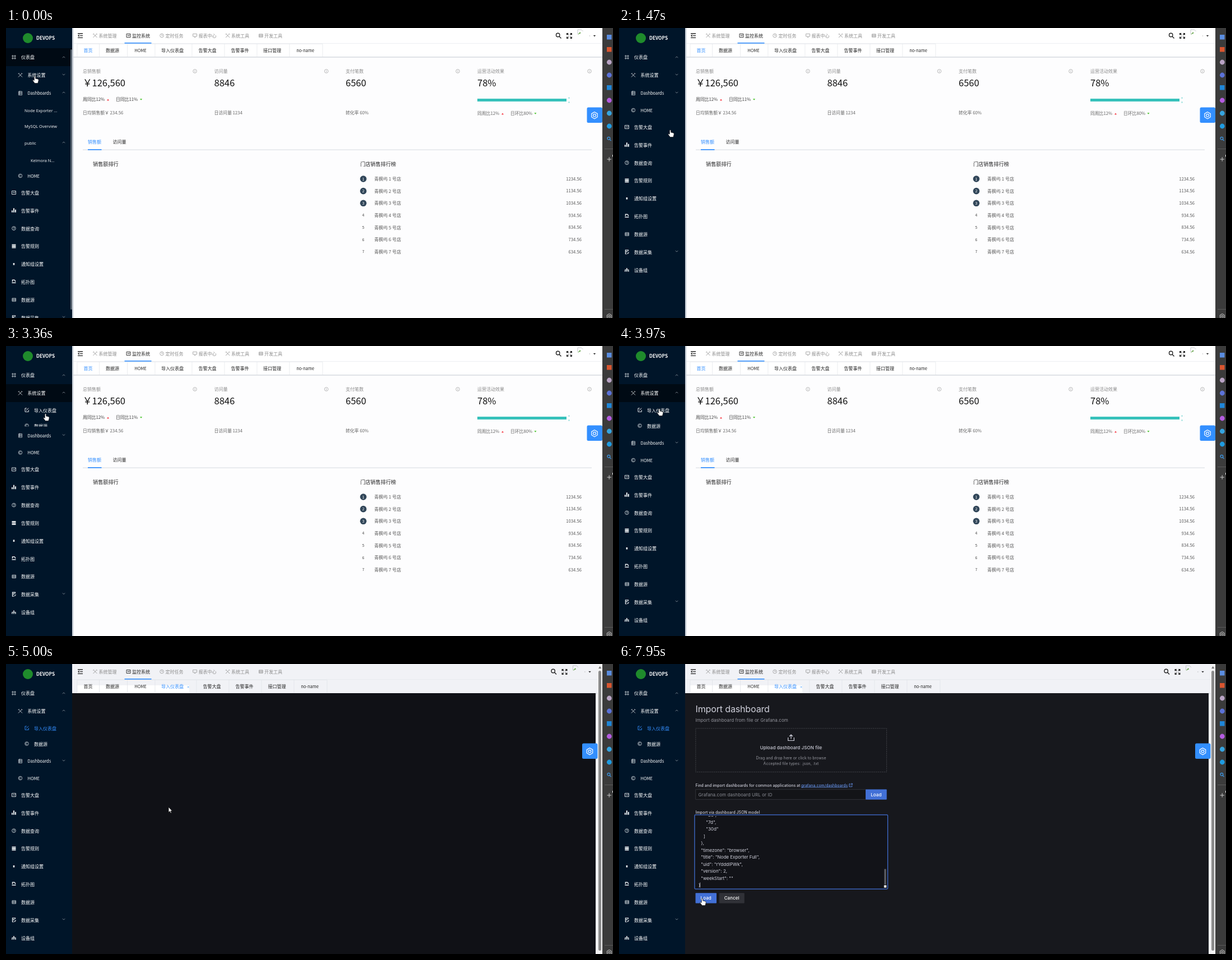
An HTML page that plays this animation: 1083 by 517 pixels, repeating every 8000 ms.

```html
<!DOCTYPE html>
<html lang="zh-CN">
<head>
<meta charset="utf-8">
<title>DEVOPS</title>
<style>
  html, body { margin: 0; width: 100%; height: 100%; overflow: hidden; background: #fff; }
  svg { display: block; }
  text { font-family: "Noto Sans CJK SC", "Noto Sans CJK JP", "Open Sans", sans-serif; }
  text.latin { font-family: "Open Sans", "Noto Sans", sans-serif; }
  .form text { font-family: Inter, Roboto, sans-serif; letter-spacing: .0107em; }
  .form text.code { letter-spacing: 0; }
</style>
</head>
<body>
<svg id="stage" width="1083" height="517" viewBox="0 0 1083 517"></svg>
<script>
const BLUE = '#338fff', NAVY = '#001529', INK = '#262626', GREY = '#666', PALE = '#8c8c8c';

const rect = (x, y, w, h, fill, more = '') =>
  `<rect x="${x}" y="${y}" width="${w}" height="${h}" fill="${fill}" ${more}/>`;
const circle = (x, y, r, fill, more = '') =>
  `<circle cx="${x}" cy="${y}" r="${r}" fill="${fill}" ${more}/>`;
const path = (d, stroke, width = .8, fill = 'none') =>
  `<path d="${d}" stroke="${stroke}" stroke-width="${width}" fill="${fill}"/>`;
// y is the middle of the line
const text = (s, x, y, fill, size = 8, more = '') =>
  `<text x="${x}" y="${y + size * .37}" fill="${fill}" font-size="${size}" ${more}>${s}</text>`;
const group = (id, body, more = '') => `<g id="${id}" ${more}>${body}</g>`;
const at = (x, y, body) => `<g transform="translate(${x} ${y})">${body}</g>`;
const MID = 'text-anchor="middle"', END = 'text-anchor="end"', MEDIUM = 'font-weight="500"';

const RING = 'M-3.3 0a3.3 3.3 0 1 0 6.6 0a3.3 3.3 0 1 0-6.6 0';
const ICONS = {
  grid: ['M-3-3h2v2h-2zM1-3h2v2h-2zM-3 1h2v2h-2zM1 1h2v2h-2z', .7],
  tools: ['M-3.5 3.5L3-3M-3-3L3.5 3.5M-3.8-2L-2-3.8M2-3.8L3.8-2', .8],
  list: ['M-3-3h6v6.5h-6zM-3-1h6M-3 1h6M-1-4v7', .7],
  copy: [RING + 'M1.3-1.2a1.8 1.8 0 1 0 0 2.4', .7],
  chart: ['M-3.5-3h7v6h-7zM-2 .5L-.5-1 .7 .8 2.5-1.5', .9],
  bars: ['M-3 3.5V0M0 3.5V-4M3 3.5V-1.5', 2],
  help: [RING + 'M-1-1a1.1 1 0 1 1 1 1.4V1M0 1.6v.7', .8],
  table: ['M-3.5-2.5h7M-3.5 0h7M-3.5 2.6h7', 2],
  dot: ['M-1.3 0h2.6', 3.6],
  topo: ['M-2.5 0v-3.3h3.5l1.5 1.5V0M-3.5 1.7h7', 1.4],
  stack: ['M-3-2.6h6.5v5.4h-6.5zM-3-.8h6.5M-3 1h6.5', .8],
  doc: ['M2.5-1.5V-3.5h-5v7h2.5M-1.5-1.5h3M-1.5 .2h2M1 3.5l2.6-3', 1.2],
  tree: ['M0-3v3M-3 2.5V0h6v2.5M-1-2.5h2M-4 2.5h2M-1 2.5h2M2 2.5h2M0 0v2', 1.2],
  edit: ['M0-3h-3v6.3h6.3V0M-1 1L3.3-3.3', .9],
  info: [RING + 'M0-.5v2.3M0-1.9v.8', .6],
  clock: [RING + 'M0-2v2h1.6', .7],
  screen: ['M-3.5-3h7v4.4h-7zM-1.5 3h3', .7],
  gear: ['M0-6L5.2-3V3L0 6-5.2 3V-3ZM-2.3 0a2.3 2.3 0 1 0 4.6 0a2.3 2.3 0 1 0-4.6 0', 1.2],
  search: ['M-4-1a3.2 3.2 0 1 0 6.4 0a3.2 3.2 0 1 0-6.4 0M1.6 1.4L5 5', 1.4],
  expand: ['M-1.3-1.3L-4-4M1.3-1.3L4-4M-1.3 1.3L-4 4M1.3 1.3L4 4M-4.4-1.5v-2.9h2.9M4.4-1.5v-2.9H1.5M-4.4 1.5v2.9h2.9M4.4 1.5v2.9H1.5', 1.2],
};
const icon = (name, x, y, color) => at(x, y, path(ICONS[name][0], color, ICONS[name][1]));
const chevron = (up, y, id = '') =>
  `<g id="${id}">${at(103, y, path(up ? 'M-2.3 1L0-1 2.3 1' : 'M-2.3-1L0 1 2.3-1', '#8a949e', .8))}</g>`;
const row = (name, label, x, y) => icon(name, x, y - .5, '#e8ebee') +
  text(label, x + 13, y, '#fff', /^\w+$/.test(label) ? 7.5 : 8, MEDIUM);

function sidebar() {
  const rest = [['chart', '告警大盘'], ['bars', '告警事件'], ['help', '数据查询'], ['table', '告警规则'],
    ['dot', '通知组设置'], ['topo', '拓扑图'], ['stack', '数据源'], ['doc', '数据采集'], ['tree', '设备组']];
  const rows = rest.map(([name, label], i) => row(name, label, 14, 177 + i * 31.82)).join('');
  const leaf = (s, x, y) => text(s, x, y, '#fff', 7.4, 'class="latin"');
  return rect(0, 0, 118, 517, NAVY) +
    group('hoverTop', rect(0, 36, 118, 32, '#000a14')) +
    group('hoverSys', rect(0, 68, 118, 32, '#000a14')) +
    circle(39, 18, 9, '#1f8b2c') + text('DEVOPS', 54, 18, '#fff', 8.3, 'font-weight="700"') +
    row('grid', '仪表盘', 14, 52.5) + chevron(true, 52) +
    row('tools', '系统设置', 25.5, 84.5) + chevron(false, 83, 'sysDown') + chevron(true, 83, 'sysUp') +
    `<svg id="sysBox" y="100" width="118" height="0">` +
      group('import', icon('edit', 37, 14, 'currentColor') + text('导入仪表盘', 50, 15, 'currentColor', 8, MEDIUM)) +
      icon('copy', 37, 42, '#e8ebee') + text('数据源', 50, 43, '#fff', 8, MEDIUM) + `</svg>` +
    group('dash', row('list', 'Dashboards', 25.5, 116.5) + chevron(false, 115, 'dashDown') + chevron(true, 115, 'dashUp') +
      `<svg id="dashBox" y="132" width="118" height="117">` +
        leaf('Node Exporter ...', 33, 15) + leaf('MySQL Overview', 33, 43) + leaf('public', 33, 73) +
        at(0, -132, chevron(true, 204)) + leaf('Kelmora N...', 44, 104) + `</svg>`) +
    group('rest', row('copy', 'HOME', 25.5, 147) + rows + chevron(false, 398)) +
    group('sideBar', rect(115, 38, 3, 464, '#56616d', 'rx="1.5"'));
}

function header() {
  const menu = [['tools', '系统管理', 159], ['chart', '监控系统', 218.5], ['clock', '定时任务', 278],
    ['screen', '报表中心', 337], ['tools', '系统工具', 395.5], ['stack', '开发工具', 454.5]];
  const items = menu.map(([name, label, x], i) => {
    const color = i == 1 ? INK : PALE;
    return icon(name, x, 13.5, color) + text(label, x + 6.5, 14, color);
  }).join('');
  const names = ['首页', '数据源', 'HOME', '导入仪表盘', '告警大盘', '告警事件', '接口管理', 'no-name'];
  const tabs = (centers, edges, active, line) =>
    edges.map(x => rect(x, 28, .8, 23, line)).join('') + rect(127, 28, edges.at(-1) - 127, .7, line) +
    names.map((s, i) => text(s, centers[i], 40, i == active ? BLUE : INK, /\w/.test(s) ? 7.5 : 8, MID)).join('');
  return rect(118, 0, 946, 52, '#fff') +
    group('greyHead', rect(118, 0, 946, 52, '#f1f2f6') + rect(127, 38, 200, 14, '#fff')) +
    rect(118, 27.2, 946, .7, '#e6e8ec') +
    path('M128 10h9M132 13.7h5M128 17.4h9', INK, 1.3) + path('M130.6 11.7v4l-2.6-2z', INK, .2, INK) +
    items + rect(211.5, 26, 48, 1.6, BLUE) +
    group('homeTabs', tabs([146.5, 190, 240, 297, 359.5, 417.5, 475, 534],
      [126.5, 166, 216, 265.5, 331.5, 389.5, 447.5, 505.5, 564.5], 0, '#e6e8ec')) +
    group('importTabs', tabs([146.5, 190, 240, 297, 367.5, 425.5, 483.5, 542],
      [126.5, 166, 216, 265.5, 339.5, 397.5, 455.5, 513.5, 572.5], 3, '#e2e4e9') +
      path('M323.7 39.5l3 3m0-3l-3 3', BLUE, .6)) +
    group('tools', icon('search', 985.5, 13.5, INK) + icon('expand', 1005, 14, INK) +
      path('M1020 11V3h6.5l3 3', '#b9bcc2', .8) + path('M1020.5 11.5l3.5-4 1.5 1.5z', '#5fa043', .3, '#5fa043') +
      rect(1041, 13, .8, 2, '#bbb') + path('M1048 13h4l-2 2.2z', INK, .2, INK));
}

function home() {
  const up = (x, y) => path(`M${x - 2} ${y + 1.2}h4l-2-2.4z`, 'none', 0, '#f5222d');
  const down = (x, y) => path(`M${x - 2} ${y - 1.2}h4l-2 2.4z`, 'none', 0, '#3cbf1c');
  const stats = [[137, '总销售额', '￥126,560', '日均销售额￥ 234.56'], [371.5, '访问量', '8846', '日访问量 1234'],
    [606, '支付笔数', '6560', '转化率 60%'], [841, '运营活动效果', '78%', '']];
  const cards = stats.map(([x, title, value, foot]) => text(title, x, 77, PALE) +
    icon('info', x + 200, 77, PALE) + text(value, x, 98, '#111', 16.5) + text(foot, x, 151, GREY, 7.8)).join('');
  let shops = '';
  for (let i = 0; i < 7; i++) {
    const y = 269 + i * 21.65, top = i < 3;
    shops += (top ? circle(637.5, y, 5.8, '#314659') : '') +
      text(i + 1, 637.5, y, top ? '#fff' : '#444', 6.8, MID) +
      text(`青枫屿 ${i + 1} 号店`, 657, y, '#595959') +
      text((1234.56 - i * 100).toFixed(2), 1027, y, '#595959', 7.7, END);
  }
  return rect(118, 52, 946, 465, '#fdfdfe') + cards +
    text('周同比12%', 137, 127.5, '#444', 7.8) + up(182, 128) + text('日同比11%', 196, 127.5, '#444', 7.8) + down(241, 127.5) +
    rect(841, 126, 159, 5, '#36c1bb') + rect(1004, 123.5, 1, 2.3, '#36c1bb') + rect(1004, 131.3, 1, 2.3, '#36c1bb') +
    text('同周比12%', 841, 152.5, GREY, 7.8) + up(886, 153) + text('日环比80%', 900, 152.5, GREY, 7.8) + down(944.5, 152.5) +
    rect(137, 216.6, 908, 1, '#d5d9e0') + rect(146, 216, 24.5, 1.7, BLUE) +
    text('销售额', 146, 203.5, BLUE) + text('访问量', 190.5, 203.5, INK) +
    text('销售额排行', 155, 243, INK, 9.15, MEDIUM) + text('门店销售排行榜', 632, 243, INK, 9.15, MEDIUM) + shops;
}

function form() {
  const lines = (list, y, color) => list.map((s, i) =>
    text(s.trim(), 141.7 + s.search(/\S/) * 2.25, y + i * 12.5, color, 8, 'class="code"')).join('');
  const hint = ['{', '    "title": "Example - Repeating Dictionary variables",', '    "uid": "_0HnEoN4z",',
    '    "panels": [...]', '    ...', '}'];
  const json = ['      "2d",', '      "7d",', '      "30d"', '    ]', '  },', '  "timezone": "browser",',
    '  "title": "Node Exporter Full",', '  "uid": "rYdddlPWk",', '  "version": 2,', '  "weekStart": ""', '}'];
  const LIGHT = '#d0d1dc', DIM = '#8a8c94', BUTTON = '#4270d6';
  const button = (s, x, y, w, fill) => rect(x, y, w, 18.3, fill, 'rx="1"') +
    text(s, x + w / 2, y + 9.2, '#fff', 8, MID + ' ' + MEDIUM);
  return rect(118, 52, 934, 465, '#17181d') +
    text('Import dashboard', 136.5, 80, LIGHT, 16, 'style="letter-spacing:-.14px"') +
    text('Import dashboard from file or Grafana.com', 136.5, 100, '#96979f') +
    rect(136.8, 114.8, 340.7, 77.7, 'none', 'stroke="#55575e" stroke-width=".7" stroke-dasharray="2 1.4"') +
    path('M301.7 131v5.5h10.6V131M307 133.5v-7M304 129l3-3 3 3', LIGHT, 1.2) +
    text('Upload dashboard JSON file', 307, 149, LIGHT, 8, MID + ' ' + MEDIUM) +
    text('Drag and drop here or click to browse', 307, 167, '#96979f', 6.86, MID) +
    text('Accepted file types: .json, .txt', 307, 177.5, '#96979f', 6.86, MID) +
    text('Find and import dashboards for common applications at', 136.5, 216, LIGHT, 6.86, MEDIUM) +
    text('grafana.com/dashboards', 325, 216, '#6e9fff', 6.86, 'text-decoration="underline"') +
    path('M413 213.8h-2.2v5h5v-2.3M413 216.5l3.2-3.2M414 213.2h2.3v2.3', '#6e9fff', .8) +
    rect(136.8, 223.8, 303.5, 17.5, '#131418', 'stroke="#3c3e45" stroke-width=".7"') +
    text('Grafana.com dashboard URL or ID', 141.5, 233, DIM) + button('Load', 440, 223.4, 37.7, BUTTON) +
    text('Import via dashboard JSON model', 136.5, 264.5, LIGHT, 6.86, MEDIUM) +
    rect(136.8, 271, 340.7, 128, '#15161a', 'stroke="#55575e" stroke-width=".7"') +
    path('M473 398l4-4M475 398l2-2', '#777', .6) +
    group('ring', rect(134.9, 268.9, 344.6, 132.2, '#121318', `stroke="${BUTTON}" stroke-width="1.25" rx="1.5"`)) +
    group('hint', lines(hint, 279, '#82848c')) +
    group('hintCaret', rect(141.6, 274, .8, 9.5, LIGHT)) +
    group('json', `<svg x="137" y="271" width="341" height="129">` +
      at(-137, -271, lines(json, 269.2, LIGHT)) + `</svg>` + rect(144.3, 389.5, .8, 9, LIGHT) +
      rect(473.3, 365.5, 3.2, 27.5, '#5d5e63') + rect(472.8, 394.3, 4.4, 4.4, '#e8e8e8')) +
    button('Load', 136.5, 408.3, 37.5, BUTTON) + button('Cancel', 178.7, 408.3, 45, '#303137');
}

function browserEdge() {
  const marks = [[16, '#5a8de0', 1], [38, '#d9552f', 1], [61, '#b9a3c4', 0], [84, '#5b72d8', 0], [106, '#1f86d8', 1],
    [129, '#b45be0', 0], [152, '#35a4e0', 0], [175, '#1f9be0', 0]];
  return rect(1064, 0, 19, 517, '#3b3b3b') +
    marks.map(([y, color, square]) => square ? rect(1072, y - 4, 8.5, 8.5, color) : circle(1076.3, y, 4.4, color)).join('') +
    at(1076, 197.5, path('M-3-.8a2.4 2.4 0 1 0 4.8 0a2.4 2.4 0 1 0-4.8 0M1.2 1.2L3.6 3.6', '#3b9cf0', 1.2)) +
    rect(1068, 215, 15, .8, '#626262') + path('M1072.5 234h7.5M1076.2 230.2v7.5', '#ddd', .9) +
    rect(1082, 226, 1, 3.5, '#eee') + rect(1068, 501, 15, .8, '#626262') +
    at(1076.3, 514, `<g transform="scale(.75)">${path(ICONS.gear[0], '#ddd', 1.2)}</g>`);
}

const cursors =
  group('hand', path('M-1.2 1q0-1.2 1.2-1.2t1.2 1.2v3l4.2 1q1.6.5 1.3 2.2l-.8 3.3-.7 2h-5.4L-3.6 8q-.6-1.4.8-1.6l1.6 1z', '#111', .7, '#fff')) +
  group('arrow', path('M0 0V9.5L2.2 7.5 3.8 11 5.3 10.3 3.8 7H6.6z', '#111', .8, '#fff')) +
  group('beam', path('M-2-4.5q2 0 2 1 0-1 2-1M0-3.5v7M-2 4.5q2 0 2-1 0 1 2 1', '#eee', .9));

document.getElementById('stage').innerHTML =
  group('home', home()) +
  group('blank', rect(118, 52, 946, 465, '#f0f2f5') + rect(118, 51.5, 937, 2, '#d9dce2') + rect(118, 52, 2, 465, '#dfe2e8')) +
  group('dark', rect(118, 52, 934, 465, '#101116')) +
  group('form', form(), 'class="form"') +
  header() + group('homeEdge', rect(118, 0, 2.5, 517, '#cdd3db') + rect(118, 51.3, 946, 1.2, '#ccd0d7')) +
  group('pageBar', rect(1055, 0, 9, 517, '#f3f3f4') + rect(1057, 12, 5, 499, '#8b8b8b', 'rx="2.5"') +
    path('M1057.2 8h5l-2.5-4z', '#777', .2, '#777')) +
  group('gearBox', rect(1036.5, 141.5, 27.5, 27.5, BLUE, 'rx="2.5"') + icon('gear', 1050, 155.7, '#fff')) +
  sidebar() + browserEdge() + group('pointer', cursors);

// The screen refreshes in bursts: first time, last time, count
const steps = [0];
for (const [from, to, n] of [[150, 1040, 7], [1200, 2170, 8], [2320, 2920, 5], [3210, 4120, 7],
  [4270, 5000, 6], [5450, 5750, 3], [6040, 6740, 6], [7040, 7950, 7]])
  for (let i = 0; i < n; i++) steps.push(from + (to - from) * i / (n - 1));

// time, x, y, shape
const moves = [[0, 51.5, 86, 'hand'], [740, 75, 115, 'hand'], [1050, 75, 115, 'hand'], [1470, 91.5, 182, 'hand'],
  [1600, 91.5, 182, 'hand'], [2170, 69, 108, 'hand'], [2920, 66, 90, 'hand'], [3215, 66, 90, 'hand'],
  [3355, 70.5, 121, 'hand'], [3500, 70.5, 121, 'hand'], [3960, 72, 112, 'hand'], [4200, 75, 112, 'arrow'],
  [4720, 284, 249, 'arrow'], [4850, 286, 251, 'arrow'], [5000, 290, 255, 'arrow'], [6030, 285, 285, 'beam'],
  [6175, 280, 304, 'beam'], [6340, 280, 304, 'beam'], [6735, 205, 410, 'arrow'], [7040, 205, 410, 'arrow'],
  [7480, 165, 414, 'hand'], [7945, 148.5, 418, 'hand'], [8001, 148.5, 418, 'hand']];

const el = id => document.getElementById(id);
const show = (id, on) => el(id).style.display = on ? '' : 'none';
const shift = (id, x, y) => el(id).setAttribute('transform', `translate(${x} ${y})`);
const ease = (t, from, to) => {
  const p = Math.min(1, Math.max(0, (t - from) / (to - from)));
  return p * p * (3 - 2 * p);
};

function draw(t) {
  const opened = t > 4110, dark = t > 4990, loaded = t > 5440, pasted = t > 7030;
  const sys = 57 * ease(t, 3210, 3432), dash = 117 * (1 - ease(t, 920, 1250));
  const sysOpen = t > 3200, dashOpen = t < 920;

  show('hoverTop', t < 200);
  show('hoverSys', sysOpen && !opened);
  show('sysUp', sysOpen);
  show('sysDown', !sysOpen);
  show('dashUp', dashOpen);
  show('dashDown', !dashOpen);
  show('sideBar', t < 1000);
  el('sysBox').setAttribute('height', sys);
  el('dashBox').setAttribute('height', dash);
  shift('dash', 0, sys);
  shift('rest', 0, sys + dash);
  el('import').style.color = opened ? BLUE : '#fff';

  for (const id of ['home', 'homeTabs', 'homeEdge']) show(id, !opened);
  for (const id of ['greyHead', 'importTabs', 'pageBar', 'blank']) show(id, opened);
  shift('tools', opened ? -8.5 : 0, 0);
  shift('gearBox', opened ? -8.5 : 0, 0);
  show('dark', dark);
  show('form', loaded);
  show('hintCaret', t > 6170 && !pasted);
  show('ring', t > 6310);
  show('hint', !pasted);
  show('json', pasted);

  const i = moves.findLastIndex(m => m[0] <= t);
  const [t0, x0, y0, shape] = moves[i], [t1, x1, y1] = moves[i + 1];
  const p = (t - t0) / (t1 - t0);
  shift('pointer', x0 + (x1 - x0) * p, y0 + (y1 - y0) * p);
  for (const id of ['hand', 'arrow', 'beam']) show(id, id == shape);
}

const start = performance.now();
function tick() {
  const t = (performance.now() - start) % 8000;
  draw(steps.findLast(s => s <= t + 10));
  requestAnimationFrame(tick);
}
tick();
</script>
</body>
</html>
```
